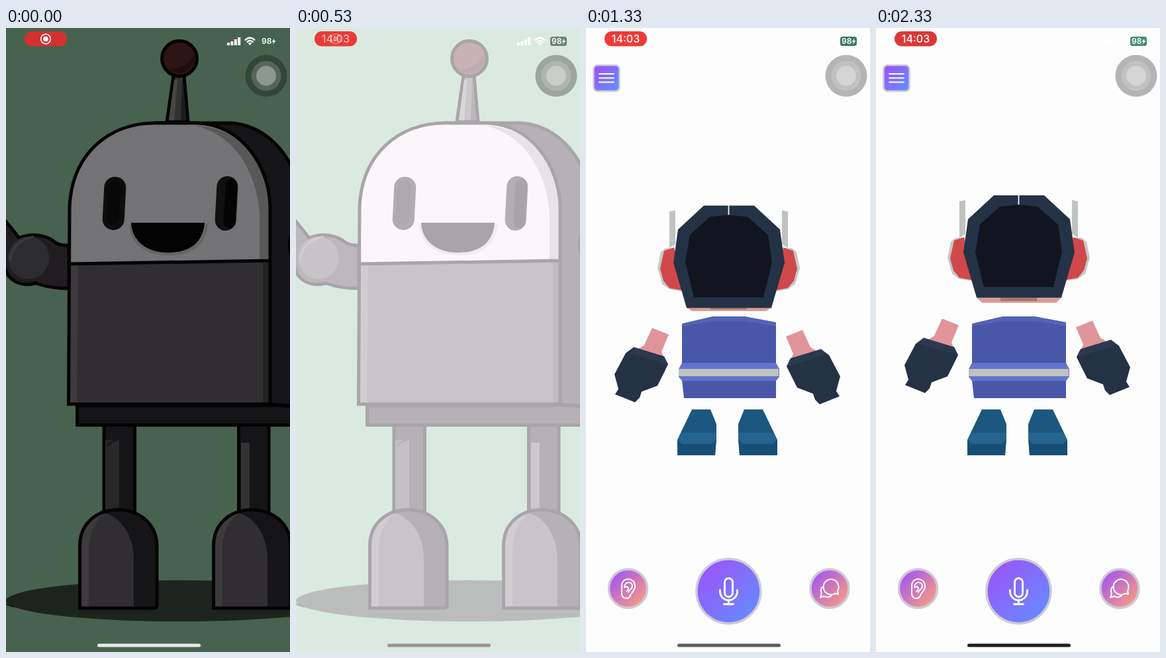
These frames come from a looping animation (429x939 px, 2.39 s). An HTML page:

```html
<!DOCTYPE html>
<html lang="en">
<head>
<meta charset="utf-8">
<title>Robot app launch</title>
<style>
  html, body { margin: 0; width: 100%; height: 100%; overflow: hidden; background: #fdfdfd; }
  svg { display: block; width: 100vw; height: 100vh; }
  text { font-family: Inter, sans-serif; fill: #fff; }
  .ink { stroke: #080709; stroke-width: 5; stroke-linejoin: round; }
  .icon { fill: none; stroke: #fff; stroke-width: 2; stroke-linecap: round; stroke-linejoin: round; }
  .rim { stroke: #cdc9d6; stroke-width: 3.5; }
</style>
</head>
<body>
<svg viewBox="0 0 429 939" preserveAspectRatio="none">
  <defs>
    <linearGradient id="violet" x2="1" y2="1">
      <stop offset=".1" stop-color="#9c54f8"/><stop offset=".9" stop-color="#648cff"/>
    </linearGradient>
    <linearGradient id="sunset" x2="1" y2="1">
      <stop offset=".12" stop-color="#a556f2"/><stop offset=".88" stop-color="#f89a82"/>
    </linearGradient>
    <g id="foot">
      <path fill="#646064" d="M111 873V780C111 745 138 725 169 725S228 745 228 780V873Z"/>
      <path fill="#7d7a7d" d="M112 872V780C112 752 130 733 152 728C136 740 125 758 125 782V872Z"/>
      <path fill="#2c292e" d="M148 729C176 737 193 766 193 800V872H227V780C227 745 200 725 169 726Z"/>
      <path class="ink" fill="none" d="M111.500 873V780C111 745 138 725 169 725S228 745 228 780V869Q228 873 224 873Z"/>
    </g>
    <g id="ear">
      <path fill="#bfc3c2" d="M126 276L135 274V325L126 331Z"/>
      <path fill="#c6c7c7" d="M108 361L113 337L120 331H134L146 396L126 393L115 385Z"/>
      <path fill="#d1484b" d="M112 362L118 335L133 330L147 395L126 391L117 380Z"/>
    </g>
    <g id="hand">
      <path fill="#e0959a" d="M100 451L125 461L114 487L118 496L75 485L88 477Z"/>
      <path fill="#243246" d="M72 480L118 494L124 506L108 538L84 547L81 556L74 563L44 551L49 543L43 521L60 489Z"/>
      <path fill="#2b394f" d="M72 480L118 494L124 506L66 489Z"/>
    </g>
    <g id="boot">
      <path fill="#1c5780" d="M160 574H188L197 596V612L195 643H138V620L144 607Z"/>
      <path fill="#24648f" d="M144 609H197V619L190 626H145L138 620Z"/>
      <path fill="#174e75" d="M138 620L145 626H190L197 619L195 643H138Z"/>
    </g>
  </defs>

  <g id="splash">
    <rect width="429" height="939" fill="#98cda8"/>
    <ellipse cx="262" cy="862" rx="262" ry="31" fill="#3c4c42"/>
    <path d="M0 867L12 871" stroke="#222" stroke-width="2"/>

    <path class="ink" fill="#403d41" d="M-5 285L20 316C42 307 64 313 75 323Q84 328 95 327V392C78 392 62 390 45 384C22 390 0 380 -3 355Z"/>
    <ellipse cx="34" cy="346" rx="31" ry="32" fill="#5f5c60"/>
    <path fill="none" stroke="#7d7a7d" stroke-width="3" d="M6 350C8 330 22 317 42 314"/>

    <path fill="#6b696b" class="ink" d="M253 72H269L275 141H243Z"/>
    <path fill="#949294" d="M254 78H259L254 139H246Z"/>
    <path fill="#39373a" d="M266 76L272 139H264Z"/>
    <circle cx="262" cy="46" r="26.500" fill="#612a2b" class="ink"/>
    <path fill="#421d20" d="M285 36A25 25 0 0 1 245 62C266 62 280 52 285 36Z"/>

    <path class="ink" fill="#2c292e" d="M225 143L340 143C385 146 417 177 434 214V570H396Z"/>
    <path fill="#f1f0f3" d="M96 354V270C100 190 155 145 225 145H290C355 148 398 208 399 270V352Z"/>
    <path fill="#bab8bb" d="M286 147C343 160 378 212 383 280V352H399V270C398 208 355 148 286 147Z"/>
    <path fill="#646064" d="M95 354L399 351V566H95Z"/>
    <path fill="#7d7a7d" d="M97 356H109L107 565H96Z"/>
    <path fill="#4c494c" d="M388 352H399V566H388Z"/>
    <path class="ink" fill="none" d="M94.500 566L96 270C99 190 155 143 225 143H290C355 146 398 206 399 270V566M96 355L399 350"/>

    <path fill="none" stroke="#d3d2d4" stroke-width="4" d="M188 296C190 325 212 340 247 340C280 339 301 325 303 294"/>
    <path fill="#070608" d="M189 293H300C298 325 275 338 245 338C212 338 190 320 189 293Z"/>
    <rect x="147" y="224" width="33" height="80" rx="16" fill="#1c1b1d" transform="rotate(3 164 264)"/>
    <rect x="152" y="230" width="20" height="66" rx="10" fill="#121113" transform="rotate(3 164 264)"/>
    <rect x="317" y="223" width="32" height="82" rx="16" fill="#232224" transform="rotate(3 333 264)"/>
    <rect x="330" y="227" width="18" height="74" rx="9" fill="#070608" transform="rotate(3 333 264)"/>
    <ellipse cx="432" cy="327" rx="6" ry="18"/>

    <path class="ink" fill="#2c292e" d="M148 596H194.500V730H148ZM351.500 596H397V730H351.500Z"/>
    <path fill="#565357" d="M150 620H171V727H150Z"/>
    <path fill="#6c696c" d="M355 624H368V726H355Z"/>
    <path fill="none" stroke="#222" stroke-width="2" d="M153 629Q158 622 168 620"/>
    <path class="ink" fill="#2c292e" d="M107.500 568H434V597.500H107.500Z"/>
    <path class="ink" fill="none" d="M92 566H398L434 570"/>
    <use href="#foot"/><use href="#foot" x="202"/>
    <rect id="dim" width="429" height="939"/>
    <rect id="veil" width="429" height="939" fill="#fffbff"/>
  </g>

  <g id="app">
    <g id="head">
      <use href="#ear"/><use href="#ear" transform="translate(431) scale(-1 1)"/>
      <path id="chin" fill="#d99c97"/>
      <path id="slot" fill="#a9786f"/>
      <path fill="#243246" d="M178 267H254L293 303L300 353L280 421H152L132 353L139 303Z"/>
      <path fill="#12151f" d="M187 284L216 281L244 284L275 311L281 352L268 405H163L150 352L157 311Z"/>
      <path stroke="#f4f4f4" stroke-width="1.8" d="M215.5 266V281"/>
    </g>
    <path fill="#4857a8" d="M145 445L192 434H239L287 443V557H148L145 530Z"/>
    <path fill="#5363b6" d="M145 445L192 434H239L287 443V449L240 441H192L145 449Z"/>
    <path fill="#6474cc" d="M145 504H287L292 513V525L287 531H145L140 525V513Z"/>
    <path fill="#bfc3c1" d="M140 513H291V524H140Z"/>
    <use href="#boot"/><use href="#boot" transform="translate(427) scale(-1 1)"/>
    <g id="hands">
      <use href="#hand"/><use href="#hand" transform="translate(427 3) scale(-1 1)"/>
    </g>

    <rect class="rim" x="11.5" y="56" width="39" height="39" rx="6" fill="url(#violet)" style="stroke-width:2.5"/>
    <path class="icon" d="M20 69H42M20 75.3H42M20 81.6H42"/>
    <circle class="rim" cx="63.5" cy="843.5" r="29" fill="url(#sunset)"/>
    <path class="icon" d="M54 841C53 825 74 826 74 840C74 848 68 849 67 854C64 861 54 859 54 851ZM58 842C58 832 70 832 70 840C70 845 65 845 64 849M58 842C64 838 66 844 61 848"/>
    <circle class="rim" cx="215.5" cy="847.5" r="48.5" fill="url(#violet)"/>
    <g class="icon" style="stroke-width:2.9">
      <rect x="209.5" y="828" width="12" height="28" rx="6"/>
      <path d="M202.500 846V848A13 13 0 0 0 228.500 848V846M215.500 861V867M208.500 867H222.500"/>
    </g>
    <circle class="rim" cx="368" cy="843.5" r="29" fill="url(#sunset)"/>
    <path class="icon" d="M381 852L380 847A11.500 11.500 0 1 0 376 851ZM357 841C354 845 355 849 356 851L354 857L360 855C364 858 369 856 371 854"/>
  </g>

  <rect id="pill" x="28" y="5" width="64" height="22.5" rx="11"/>
  <g id="record">
    <circle cx="60" cy="16.500" r="7.300" fill="none" stroke="#fff" stroke-width="1.600"/>
    <circle cx="60" cy="16.500" r="3.800" fill="#fff"/>
  </g>
  <text id="clock" x="60" y="22" font-size="16" font-weight="500" text-anchor="middle">14:03</text>
  <g fill="#fff">
    <path d="M334 22h4v4h-4ZM339.400 20h4v6h-4ZM344.800 17h4v9h-4ZM350.200 14h4v12h-4Z"/>
    <path d="M368.500 26L365.500 23Q368.500 20.500 371.500 23Z"/>
    <path fill="none" stroke="#fff" stroke-width="2.200" d="M361 18.500Q368.500 11 376 18.500M363.500 21.500Q368.500 16.500 373.500 21.500"/>
  </g>
  <rect id="battery" x="384" y="13" width="25" height="14" rx="3.5"/>
  <text x="386" y="24.300" font-size="12" font-weight="600">98</text>
  <path fill="#fff" d="M405.500 15.500L401.500 21H404L403 25L407.500 19H404.800Z"/>
  <g fill="#fff">
    <circle cx="393" cy="72" r="31.500" fill="#000" opacity=".29"/>
    <circle cx="393" cy="72" r="22.500" opacity=".17"/>
    <circle cx="393" cy="72" r="15" opacity=".33"/>
  </g>
  <rect id="home" x="138" y="926.500" width="156" height="5" rx="2.500"/>
</svg>
<script>
const LOOP = 2390, STEP = 1000 / 15;
const $ = id => document.getElementById(id);
const ramp = (t, a, b) => Math.min(1, Math.max(0, (t - a) / (b - a)));
const set = (id, name, value) => $(id).setAttribute(name, value);
const show = (id, on) => set(id, 'visibility', on ? 'visible' : 'hidden');

// Each key is [time, red, green, blue].
const tints = {
  pill: [[0, 211, 49, 47], [400, 228, 58, 54], [940, 252, 60, 53], [1330, 240, 58, 54], [1930, 207, 50, 50], [2330, 221, 55, 53]],
  battery: [[0, 58, 102, 74], [400, 86, 122, 98], [530, 104, 134, 112], [940, 103, 170, 124], [1330, 60, 122, 106], [1930, 43, 122, 110], [2330, 67, 141, 113]],
  home: [[0, 232, 232, 232], [400, 154, 154, 154], [530, 156, 148, 146], [940, 125, 121, 124], [1330, 95, 92, 96], [1930, 47, 44, 49], [2330, 31, 29, 33]]
};

function tint(keys, t) {
  const i = Math.max(1, keys.findIndex(key => key[0] >= t));
  const from = keys[i - 1], to = keys[i], k = ramp(t, from[0], to[0]);
  return `rgb(${[1, 2, 3].map(c => from[c] + (to[c] - from[c]) * k)})`;
}

function draw(t) {
  set('dim', 'opacity', 0.52 * (1 - ramp(t, 0, 330)));
  set('veil', 'opacity', ramp(t, 405, 602));
  set('record', 'opacity', 1 - ramp(t, 430, 590));
  set('clock', 'opacity', ramp(t, 350, 630));
  show('splash', t < 590);
  show('app', t > 1100);
  for (const id in tints) set(id, 'fill', tint(tints[id], Math.min(t, 2330)));

  const bob = 14.4 * Math.cos((t - 1655) * Math.PI / 1000) - 7.5;
  const chin = 426 - bob * 0.18;
  set('head', 'transform', `translate(0 ${bob})`);
  set('hands', 'transform', `translate(0 ${bob * 0.9})`);
  set('chin', 'd', `M151 420H281L272 ${chin}H160Z`);
  set('slot', 'd', `M188 420H243V${chin - 2.5}H188Z`);
}

const start = performance.now();
function tick() {
  const t = (performance.now() - start) % LOOP;
  draw(Math.floor((t + 7) / STEP) * STEP);
  requestAnimationFrame(tick);
}
tick();
</script>
</body>
</html>
```
